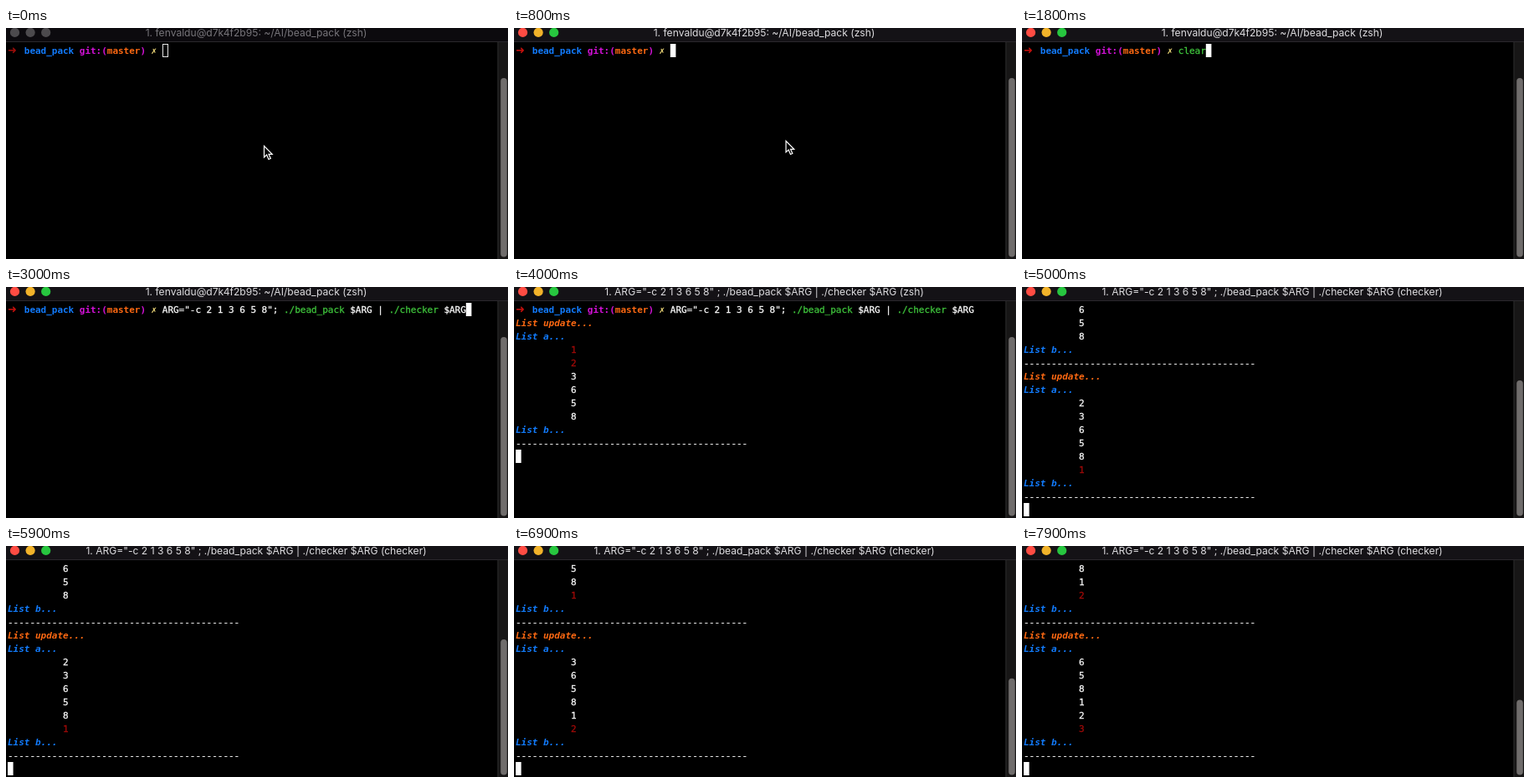
These frames come from a looping animation (600x277 px, 8000 ms). An HTML page with a canvas:

```html
<!DOCTYPE html>
<html lang="en">
<head>
<meta charset="utf-8">
<title>Terminal</title>
<style>
html, body { margin: 0; width: 100%; height: 100%; overflow: hidden; background: #000; }
canvas { display: block; }
</style>
</head>
<body>
<canvas id="stage" width="600" height="277"></canvas>
<script>
const ctx = document.getElementById('stage').getContext('2d');
const LOOP = 8000, CELL = 6.6, ROW = 16, LEFT = 2, TOP = 19, ROWS = 16;
const FOCUS = 500, TYPE = 1200, CLEAR = 2000, RECALL = 2400;
const ENTER = 3900, FIRST = 4000, STEP = 1000;
const REGULAR = '11px "DejaVu Sans Mono", monospace';
const BOLD = 'bold ' + REGULAR, SLANTED = 'italic ' + BOLD;
const SYMBOL = 'bold 13px "DejaVu Sans", sans-serif';
const C = {
  white: '#f8f8f8', blue: '#127cff', magenta: '#d411d8', orange: '#ff6912',
  yellow: '#f7e07c', green: '#3fc43c', red: '#c4100c', dark: '#a00a08'
};
const PROJECT = 'bead_pack';
const HOME = `1. fenvaldu@d7k4f2b95: ~/AI/${PROJECT} (zsh)`;
const RUN = `1. ARG="-c 2 1 3 6 5 8" ; ./${PROJECT} $ARG | ./checker $ARG `;
const LISTS = ['123658', '236581', '365812', '658123'];

// A line is a list of runs: [column, text, colour, font]
const prompt = focused => [
  [0, '➜', focused ? C.red : '#9c0d0a', SYMBOL],
  [3, PROJECT, C.blue, BOLD],
  [13, 'git:(', C.magenta, BOLD],
  [18, 'master', C.orange, BOLD],
  [24, ')', C.magenta, BOLD],
  [26, '✗', C.yellow, BOLD]
];

const command = [
  [28, 'ARG="-c 2 1 3 6 5 8";', C.white],
  [50, './' + PROJECT, C.green],
  [62, '$ARG |', C.white],
  [69, './checker', C.green],
  [79, '$ARG', C.white]
];

function update(n) {
  const moved = i => n ? i === 5 : i < 2;
  return [
    [[0, 'List update...', C.orange, SLANTED]],
    [[0, 'List a...', C.blue, SLANTED]],
    ...[...LISTS[n]].map((d, i) => [[10, d, moved(i) ? C.dark : C.white]]),
    [[0, 'List b...', C.blue, SLANTED]],
    [[0, '-'.repeat(42), C.white]]
  ];
}

// Screen contents and cursor cell at time t
function terminal(t) {
  const first = prompt(t >= FOCUS);
  const lines = [first];
  let col = 28, row = 0;
  if (t >= TYPE && t < CLEAR) {
    const typed = 'clear'.slice(0, 1 + Math.floor((t - TYPE) / 100));
    const done = typed === 'clear';
    first.push([28, typed, done ? C.green : C.red, done ? REGULAR : BOLD]);
    col += typed.length;
  } else if (t >= RECALL) {
    first.push(...command);
    col = 83;
  }
  if (t >= ENTER) {
    const count = t < FIRST ? 0 : 1 + Math.floor((t - FIRST) / STEP);
    for (let n = 0; n < count; n++) lines.push(...update(n));
    row = lines.length;
    col = 0;
  }
  return { lines, row, col, top: Math.max(0, row - ROWS + 1) };
}

// Regular text gets a hairline outline, like smoothed screen type
function drawRun(row, [col, text, colour, font = REGULAR]) {
  ctx.fillStyle = ctx.strokeStyle = colour;
  ctx.lineWidth = 0.3;
  ctx.font = font;
  [...text].forEach((ch, i) => {
    const x = LEFT + (col + i) * CELL, y = TOP + row * ROW + 12;
    ctx.fillText(ch, x, y);
    if (font === REGULAR) ctx.strokeText(ch, x, y);
  });
}

function drawTitle(t, focused) {
  ctx.fillStyle = focused ? '#141216' : '#0c0a0e';
  ctx.fillRect(0, 0, 600, 16);
  ctx.fillStyle = '#2a282c';
  ctx.fillRect(0, 16, 600, 1);
  ['#ff4c43', '#f2b32a', '#27c63f'].forEach((colour, i) => {
    ctx.fillStyle = focused ? colour : '#4c4a4d';
    ctx.beginPath();
    ctx.arc(10.5 + 18.6 * i, 5.4, 5.6, 0, 7);
    ctx.fill();
  });
  ctx.fillStyle = focused ? '#dedde0' : '#77757a';
  ctx.font = '12.1px Inter, "Liberation Sans", sans-serif';
  ctx.textAlign = 'center';
  const title = t < ENTER ? HOME : RUN + (t < FIRST + STEP ? '(zsh)' : '(checker)');
  ctx.fillText(title, 299, 10.3);
  ctx.textAlign = 'left';
}

function drawScrollbar(top) {
  ctx.fillStyle = '#171616';
  ctx.fillRect(587.5, 17, 12.5, 260);
  ctx.fillStyle = '#2b2a2a';
  ctx.fillRect(587.5, 17, 1, 260);
  const height = 4022 / (18.75 + top);
  ctx.fillStyle = '#706d6c';
  ctx.beginPath();
  ctx.roundRect(591.2, 274.5 - height, 7.6, height, 3.8);
  ctx.fill();
}

const pointer = new Path2D('M0 0V13.5L3.1 10.6L5.4 16L7.8 15L5.5 9.8H9.7Z');

function drawPointer(t) {
  if (t >= TYPE) return;
  const k = Math.min(1, Math.max(0, (t - FOCUS) / 400));
  ctx.save();
  ctx.translate(308.5 + 22 * k, 141.5 - 8 * k);
  ctx.fillStyle = '#000';
  ctx.strokeStyle = '#fff';
  ctx.lineWidth = 1.2;
  ctx.fill(pointer);
  ctx.stroke(pointer);
  ctx.restore();
}

function draw(t) {
  const focused = t >= FOCUS;
  const { lines, row, col, top } = terminal(t);
  ctx.fillStyle = '#000';
  ctx.fillRect(0, 0, 600, 277);
  drawTitle(t, focused);
  lines.slice(top).forEach((runs, r) => runs.forEach(run => drawRun(r, run)));
  const x = LEFT + col * CELL, y = TOP + (row - top) * ROW;
  if (focused) {
    ctx.fillStyle = '#fff';
    ctx.fillRect(x, y, CELL, ROW);
  } else {
    ctx.strokeStyle = '#e8e8e8';
    ctx.lineWidth = 1;
    ctx.strokeRect(Math.round(x) + 0.5, y + 0.5, 6, ROW - 1);
  }
  drawScrollbar(top);
  drawPointer(t);
}

const start = performance.now();
function frame() {
  draw((performance.now() - start) % LOOP);
  requestAnimationFrame(frame);
}
frame();
</script>
</body>
</html>
```
